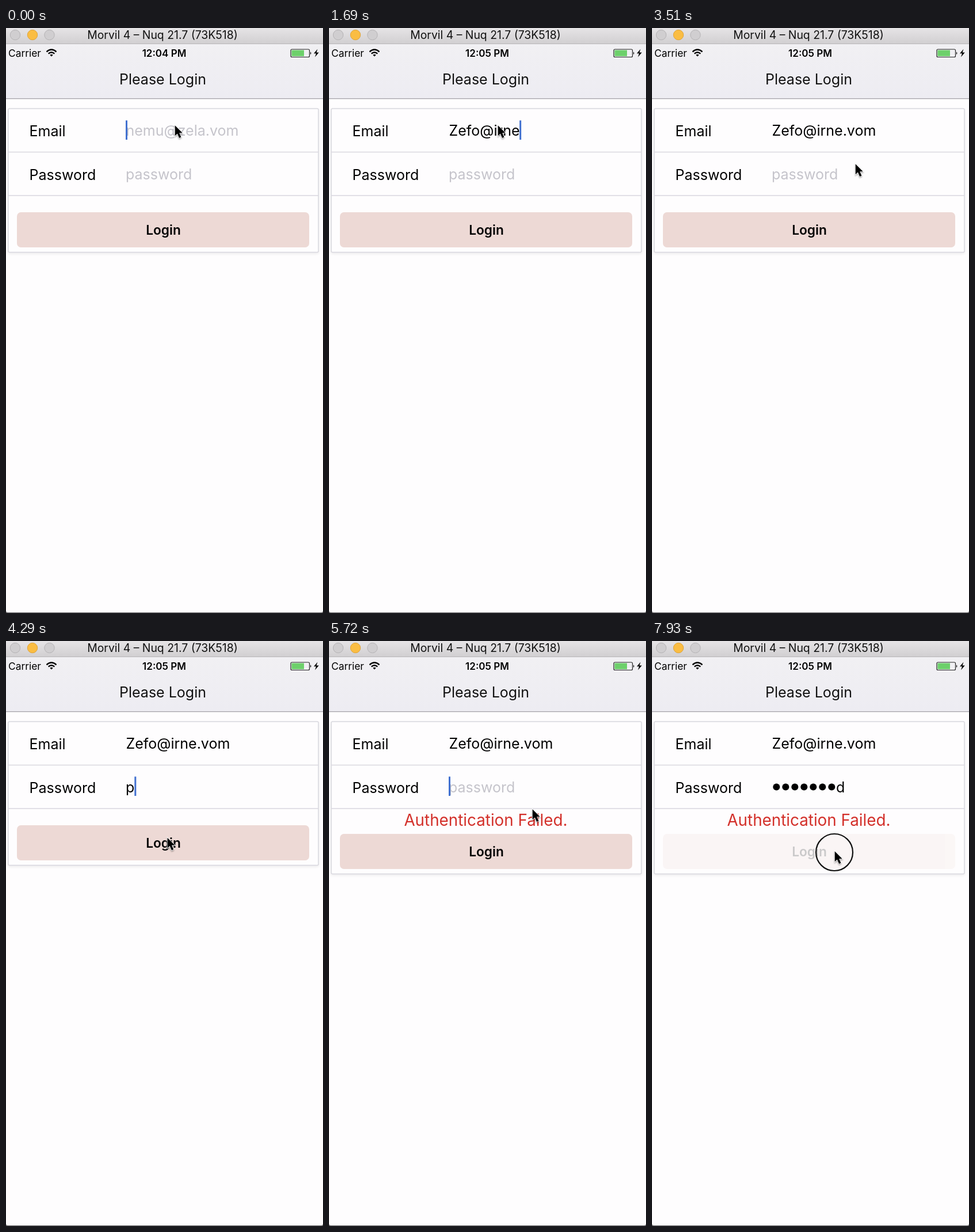
Write an HTML page that moves like this. It is 551x1016 px and loops after 8 s.

```html
<!DOCTYPE html>
<html lang="en">
<head>
<meta charset="utf-8">
<title>Login form</title>
<style>
  html, body { margin: 0; width: 100%; height: 100%; overflow: hidden; background: #fefdfe; }
  svg { display: block; width: 551px; height: 1016px; font: 25px Inter, Roboto, sans-serif; }
  .mid { text-anchor: middle; }
  .hint { fill: #c5c4cb; }
  .line { stroke: #d9d8df; stroke-width: 1.6; }
  .caret { fill: #4271d0; }
  #card { fill: #fefdfe; stroke: #d8d7de; stroke-width: 1.5; filter: drop-shadow(0 2px 2px #0001); }
  #arrow { filter: drop-shadow(0 2px 1.5px #0005); }
</style>
</head>
<body>
<svg viewBox="0 0 551 1016">
  <defs>
    <linearGradient id="bar" x2="0" y2="1">
      <stop stop-color="#e6e4e6"/><stop offset="1" stop-color="#d1cfd1"/>
    </linearGradient>
    <linearGradient id="nav" x2="0" y2="1">
      <stop stop-color="#f1f0f3"/><stop offset="1" stop-color="#edecf2"/>
    </linearGradient>
  </defs>

  <rect width="551" height="1016" fill="#fefdfe"/>
  <rect y="27" width="551" height="96" fill="url(#nav)"/>
  <rect y="122" width="551" height="1.3" fill="#a5a4aa"/>
  <rect width="551" height="27" fill="url(#bar)"/>
  <rect y="27" width="551" height="1" fill="#b8b6b8"/>
  <path d="M0 1012Q0 1015 3 1015H548Q551 1015 551 1012V1016H0Z" fill="#5c5b5e"/>
  <g fill="#d0ced0" stroke="#b5b3b5">
    <circle cx="16" cy="12" r="8.7"/>
    <circle cx="46" cy="12" r="8.7" fill="#fabd43" stroke="#dea43c"/>
    <circle cx="75.500" cy="12" r="8.7"/>
  </g>
  <text class="mid" x="272" y="19" font-size="19.400" fill="#111">Morvil 4 – Nuq 21.7 (73K518)</text>

  <text x="4" y="49.500" font-size="17.400">Carrier</text>
  <g fill="none" stroke="#000" stroke-width="2.400">
    <path d="M70.500 41.300Q79 33.700 87.500 41.300M73.700 44.700Q79 40 84.300 44.700"/>
    <path d="M76.300 46.800Q79 44.600 81.700 46.800L79 49.600Z" fill="#000" stroke="none"/>
  </g>
  <text id="clock" class="mid" x="275" y="49.500" font-size="17" font-weight="600"></text>
  <rect x="495" y="37" width="32.500" height="13.500" rx="2" fill="none" stroke="#222" stroke-width="1.200"/>
  <rect x="496.500" y="38.500" width="21.500" height="10.500" fill="#6dd06b"/>
  <path d="M529 41.300q2.600 2.500 0 5z"/>
  <path d="M541.500 36.500L535 44.300h4l-2 6.200 6.800-8h-4.200z"/>
  <text class="mid" x="272.500" y="98" fill="#111">Please Login</text>

  <rect id="card" x="4" y="140" width="539" rx="2"/>
  <path class="line" d="M4 215.500H543M4 291H543"/>
  <text x="40.500" y="188">Email</text>
  <text x="40.500" y="263.500">Password</text>

  <text id="email" x="208.500" y="187"></text>
  <text id="secret" y="263"></text>
  <g id="bullets"></g>
  <rect id="emailCaret" class="caret" y="160.500" width="3" height="33.500"/>
  <rect id="secretCaret" class="caret" y="235.500" width="3" height="33.500"/>

  <text id="failed" class="mid" x="272.500" y="321" font-size="27.800" fill="#d3302a">Authentication Failed.</text>
  <g id="button">
    <rect x="19" y="320" width="508" height="61" rx="7" fill="#edd9d5"/>
    <text class="mid" x="273.500" y="359" font-size="22.700" font-weight="600">Login</text>
  </g>
  <g id="spinner" transform="translate(271 344)" stroke="#a0a0a0" stroke-width="4.200" stroke-linecap="round"></g>

  <g id="pointer">
    <circle id="ring" cy="3" r="32" fill="none" stroke="#111" stroke-width="2.200"/>
    <path id="arrow" transform="translate(.7 1.2) scale(.88)" d="M0 0V20.500L4.700 16.300 8.400 24.700 12.200 23 8.500 14.900H14.800Z" stroke="#fff" stroke-width="1.800" paint-order="stroke"/>
  </g>
</svg>

<script>
const LOOP = 8000, STEP = 130;
const EMAIL = 'Zefo@irne.vom', EMAIL_HINT = 'nemu@zela.vom', SECRET = 'password';
const emailKeys = [390, 520, 650, 780, 1040, 1300, 1430, 1560, 1690, 1820, 1820, 1820, 1950];
const firstKeys = [3900];
const secondKeys = [6240, 6370, 6500, 6630, 6890, 7020, 7150, 7280];
const FOCUS = 3640, LOADING = 4550, FAILED = 5070, REFOCUS = 5460;

// Pointer moves: start, end, target x, target y
const moves = [[2990, 3380, 353, 235], [3990, 4350, 274, 349], [5070, 5460, 353, 291], [7410, 7800, 317, 364]];
// Ring and button press intervals
const clicks = [[FOCUS, 3770], [4420, 4550], [REFOCUS, 5590], [7800, LOOP]];
const presses = [clicks[1], clicks[3]];

const $ = id => document.getElementById(id);
const set = (id, attrs) => { for (const k in attrs) $(id).setAttribute(k, attrs[k]); };
const show = (id, on) => set(id, { visibility: on ? 'visible' : 'hidden' });
const within = (t, [from, to]) => t >= from && t < to;
const count = (keys, t) => keys.filter(k => k <= t).length;
const ease = p => p * p * (3 - 2 * p);

function add(parent, tag, attrs) {
  const el = document.createElementNS('http://www.w3.org/2000/svg', tag);
  for (const k in attrs) el.setAttribute(k, attrs[k]);
  return $(parent).appendChild(el);
}
const bullets = Array.from(SECRET, (_, i) => add('bullets', 'circle', { cx: 216.3 + 16 * i, cy: 253.5, r: 6 }));
const spokes = Array.from({ length: 12 }, (_, i) =>
  add('spinner', 'path', { d: 'M0-14.500V-23.500', transform: `rotate(${i * 30})` }));

function setText(id, text, isHint) {
  $(id).textContent = text;
  $(id).classList.toggle('hint', isHint);
}

// The caret stays lit for half a second after focus or a key, then blinks
function drawCaret(id, x, t, focus, keys) {
  const since = t - Math.max(focus, ...keys.filter(k => k <= t));
  set(id, { x });
  show(id, since >= 0 && since % 1000 < 500);
}

function drawEmail(t) {
  const n = count(emailKeys, t);
  setText('email', n ? EMAIL.slice(0, n) : EMAIL_HINT, !n);
  const width = n ? $('email').getComputedTextLength() : 0;
  drawCaret('emailCaret', 208 + width, t, 0, emailKeys);
  if (t >= FOCUS) show('emailCaret', false);
}

function drawSecret(t) {
  const retry = t >= FAILED, keys = retry ? secondKeys : firstKeys;
  const n = count(keys, t), hidden = Math.max(0, n - 1);
  bullets.forEach((b, i) => b.setAttribute('visibility', i < hidden ? 'visible' : 'hidden'));
  set('secret', { x: 208 + 16 * hidden });
  setText('secret', n ? SECRET[n - 1] : SECRET, !n);
  const width = n ? 16 * hidden + $('secret').getComputedTextLength() : 0;
  drawCaret('secretCaret', 208 + width, t, retry ? REFOCUS : FOCUS, keys);
  if (within(t, [LOADING, REFOCUS])) show('secretCaret', false);
}

function drawAction(t) {
  const loading = within(t, [LOADING, FAILED]), failed = t >= FAILED;
  set('card', { height: loading ? 241 : failed ? 264.5 : 249.5 });
  show('failed', failed);
  show('button', !loading);
  show('spinner', loading);
  const press = presses.find(p => within(t, p));
  const opacity = press ? 1 - 0.8 * Math.min(1, (t - press[0] + 30) / 150) : 1;
  set('button', { transform: `translate(0 ${failed ? 15 : 0})`, opacity });
  const head = 2 + Math.floor((t - 4810) * 12 / 1000);
  spokes.forEach((s, i) => {
    const age = (((head - i) % 12) + 12) % 12;
    s.setAttribute('opacity', Math.max(0.25, 1 - age * 0.11));
  });
}

function drawPointer(t) {
  let x = 293, y = 168;
  for (const [from, to, tx, ty] of moves) {
    const p = ease(Math.min(1, Math.max(0, (t - from) / (to - from))));
    x += (tx - x) * p;
    y += (ty - y) * p;
  }
  set('pointer', { transform: `translate(${x} ${y})` });
  show('ring', clicks.some(c => within(t, c)));
}

function draw(now) {
  const t = Math.floor((now % LOOP) / STEP) * STEP;
  $('clock').textContent = t < 520 ? '12:04 PM' : '12:05 PM';
  drawEmail(t);
  drawSecret(t);
  drawAction(t);
  drawPointer(t);
}

const start = performance.now();
function tick() {
  draw(performance.now() - start);
  requestAnimationFrame(tick);
}
tick();
</script>
</body>
</html>
```
